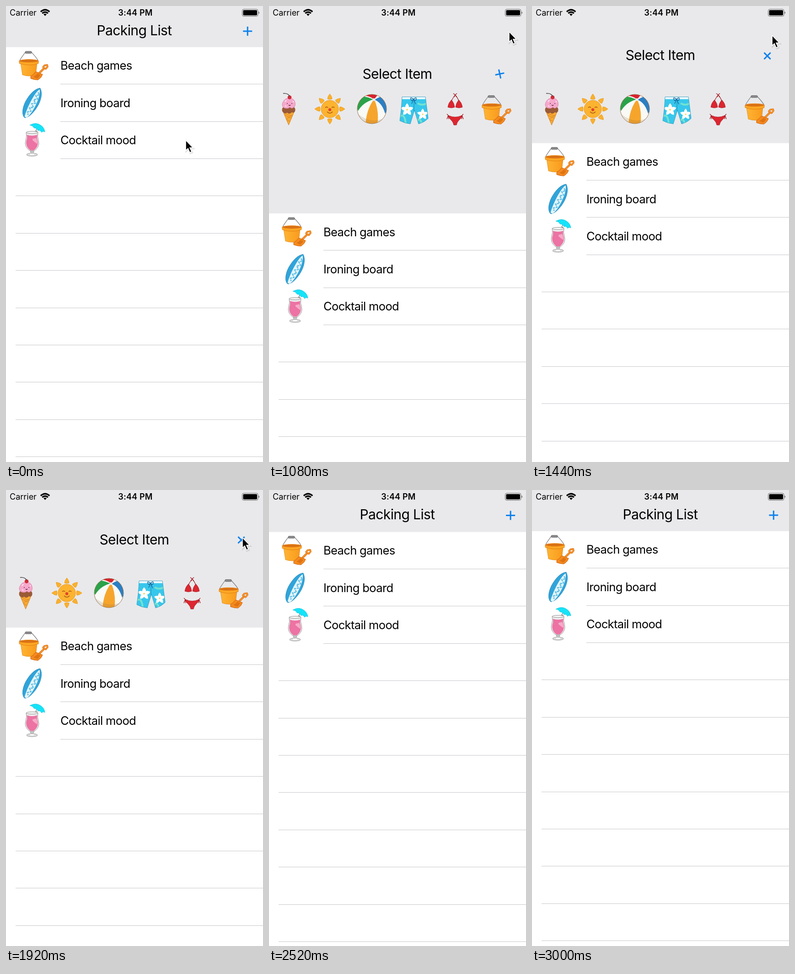
An HTML page that plays this animation: 562 px wide and 996 px high, repeating every 3.06 s.

```html
<!DOCTYPE html>
<html lang="en">
<head>
<meta charset="utf-8">
<title>Packing list</title>
<style>
  html, body { margin: 0; width: 100%; height: 100%; overflow: hidden; background: #fff; }
  svg { display: block; width: 562px; height: 996px; font-family: Inter, Roboto, sans-serif; }
  .title { font-size: 30px; letter-spacing: -.02em; text-anchor: middle; }
  .row { font-size: 25.5px; letter-spacing: -.025em; }
  .status { font-size: 18px; }
  .clock { font-weight: 600; text-anchor: middle; letter-spacing: .2px; }
</style>
</head>
<body>
<svg viewBox="0 0 562 996">
  <defs>
    <linearGradient id="orange"><stop stop-color="#ffb433"/><stop offset="1" stop-color="#f99a1c"/></linearGradient>
    <clipPath id="round"><circle r="32"/></clipPath>
    <clipPath id="legs"><path d="M-26-28H25L31 19Q22 28 10 31L1 1L-8 31Q-20 30-31 24Q-27 0-26-28Z"/></clipPath>

    <g id="bucket" stroke-linejoin="round">
      <path d="M-31-9Q-30-13-18-29H-4Q10-14 11-9" fill="none" stroke="#777" stroke-width="1.2"/>
      <rect x="-18" y="-31.5" width="14" height="4.5" rx="1.5" fill="#8a8a8d" stroke="#555" stroke-width=".7"/>
      <path d="M-28-6L-24 20Q-9 25 5 20L8-6Z" fill="url(#orange)" stroke="#e08a18" stroke-width=".8"/>
      <path d="M-31-10V-5Q-10 2 11-5V-10Z" fill="#fda724" stroke="#d9780f" stroke-width=".8"/>
      <ellipse cx="-10" cy="-10.5" rx="20.5" ry="3.2" fill="#d87216" stroke="#f28a16"/>
      <path d="M12 17L24 5" stroke="#c9620d" stroke-width="4.4"/>
      <path d="M12 17L24 5" stroke="#fb9428" stroke-width="3"/>
      <path d="M21 3L24-.5L30-1.500L31 2L27 7Z" fill="none" stroke="#c9620d" stroke-width="3.6"/>
      <path d="M21 3L24-.5L30-1.500L31 2L27 7Z" fill="none" stroke="#fb9428" stroke-width="2.400"/>
      <path d="M-6 23Q0 20 5 13L20 19Q18 26 10 31Q2 31-6 28Z" fill="#f68a1f" stroke="#c9620d"/>
      <path d="M0 24Q6 21 9 17L15 20Q12 26 8 28Z" fill="#df7413"/>
    </g>

    <g id="board" transform="rotate(27)">
      <path d="M1-37C11-30 15-14 14 1S8 33 0 36C-10 33-15 15-14 0S-9-30 1-37Z" fill="#2fa4da" stroke="#2b86b4" stroke-width=".8"/>
      <path d="M1-34C11-24 12 20 4 34H-1C-5 20-6-22 1-34Z" fill="#e4f5fb"/>
      <path d="M1-27L6-23L0-18L7-13L0-8L7-3L0 2L7 7L0 12L6 17L0 22L4 27" fill="none" stroke="#62c0e4" stroke-width="2.6" stroke-dasharray="5 1.5"/>
    </g>

    <g id="cocktail">
      <path d="M2-9L14-32" stroke="#777" stroke-width="1.3"/>
      <path d="M6-14L11-20" stroke="#555" stroke-width="2"/>
      <path d="M-5-33Q9-41 20-32Q27-27 28-18Q24-21 21-17Q18-23 13-21Q10-27 4-27Q2-32-5-33Z" fill="#16e3f8" stroke="#18b9d4" stroke-width=".7"/>
      <path d="M-13-17Q-11-8-14 0Q-18 14-5 23H5Q18 14 14 0Q11-8 13-17Z" fill="#eee" stroke="#999"/>
      <path d="M-11.500-12Q-10-5-12.500 1Q-15 13-4 22H4Q15 13 12.500 1Q10-5 11.500-12Q0-8-11.500-12Z" fill="#ec73a3"/>
      <path d="M1-3L9-5Q13 3 11 8Q7 5 1 0Z" fill="#f7abc8"/>
      <ellipse cy="-17" rx="13" ry="2.5" fill="#f5f5f5" stroke="#8f8f8f"/>
      <path d="M-4 24H4L2 31H-2Z" fill="#ccc" stroke="#999" stroke-width=".8"/>
      <ellipse cy="31.500" rx="12" ry="3.3" fill="#dcdcdc" stroke="#999"/>
      <ellipse cy="30.500" rx="5" ry="1.600" fill="#fff"/>
    </g>

    <g id="cone">
      <path d="M-13 4L0 35L13 4Z" fill="#f9a932" stroke="#c9771b" stroke-width=".8"/>
      <path d="M-9 13L6 20M-5 23L3 27M8 13L-5 22M-10 9L8 16" stroke="#d58425"/>
      <path d="M-14 5Q-17-7 0-7Q17-7 14 5Q11 10 7 7Q2 13-3 8Q-9 12-14 5Z" fill="#9a5a36"/>
      <path d="M-11-3Q-16-8-13-14Q-9-24 1-24Q12-24 14-14Q16-6 10-3Q6 0 3-4Q-3 1-11-3Z" fill="#f6a9cc" stroke="#d77ba7" stroke-width=".8"/>
      <circle cx="2" cy="-25.500" r="4.300" fill="#cf2b38"/>
      <path d="M2-28Q-1-35-12-34" fill="none" stroke="#333" stroke-width="1.400"/>
      <path d="M-3-13v2M7-13v2M0-9Q2-6 4-9" fill="none" stroke="#5c2b40" stroke-width="1.4"/>
      <path d="M-8-16l3-3M9-17l2 2M-8-7l3 1" stroke="#fff" stroke-width="1.6"/>
    </g>

    <g id="sun">
      <g id="rays" fill="#fbb02c" stroke="#e99816" stroke-width=".8"></g>
      <circle r="19" fill="#fcb32f" stroke="#ee981b"/>
      <path d="M-10-3Q-7-6-4-3M4-3Q7-6 10-3M-6 6Q0 12 6 6" fill="none" stroke="#a34a12" stroke-width="1.4"/>
      <circle cy="1.500" r="3.2" fill="#e0432b"/>
    </g>

    <g id="ball">
      <g clip-path="url(#round)">
        <circle r="32" fill="#f9f9f6"/>
        <path d="M5-21Q-4-28-14-29L-8-34L16-34Q10-28 5-21Z" fill="#d8232f"/>
        <path d="M3-21Q-20-14-30 4L-36-8L-20-28Q-8-26 3-21Z" fill="#2ba24a"/>
        <path d="M6-20Q22-14 29 10L38-6L22-27Q14-26 6-20Z" fill="#2b7fc3"/>
        <path d="M3-19Q-12 2-14 34H12Q16 4 6-19Z" fill="#f6a52c"/>
        <path d="M-31 10Q-3 34 26 20L15 36H-20Z" fill="#8b6b3f" opacity=".18"/>
      </g>
      <circle cx="4.500" cy="-20.500" r="2.8" fill="#fff" stroke="#ccc" stroke-width=".6"/>
      <circle r="32" fill="none" stroke="#9b7653"/>
    </g>

    <g id="shorts">
      <g clip-path="url(#legs)">
        <rect x="-34" y="-30" width="68" height="64" fill="#37c7ec"/>
        <path d="M-30 14Q-20 8-18 31M8-14Q18-8 28-14M8 24Q13 16 17 30" fill="none" stroke="#72e2cf" stroke-width="4"/>
        <path d="M0-20V3" stroke="#1c93bd" stroke-width="1.2"/>
        <g class="flower" transform="translate(-15 0)"></g>
        <g class="flower" transform="translate(19 10) scale(.9)"></g>
        <rect x="-30" y="-30" width="60" height="7" fill="#eefaff"/>
      </g>
      <path d="M-26-28H25L31 19Q22 28 10 31L1 1L-8 31Q-20 30-31 24Q-27 0-26-28Z" fill="none" stroke="#2795b8" stroke-width=".8"/>
      <path d="M-1-23Q-9-29-7-23T-1-23Q6-29 5-23T-1-23L-5-13M-1-23L4-12" fill="none" stroke="#18649b" stroke-width="1.3"/>
    </g>

    <g id="bikini" fill="#dc2630" stroke="#a3151d" stroke-width=".7">
      <path d="M-8-19Q-3-28 0-32Q4-28 8-19M0-32L-4-35M0-32L4-35M0-32L-2-27M0-32L3-27" fill="none" stroke-width="1.2"/>
      <path d="M-8-21Q-2-14-1-5Q-8-2-16-5Q-15-14-8-21ZM8-21Q2-14 1-5Q8-2 16-5Q15-14 8-21Z"/>
      <path d="M-15 13Q0 20 15 13Q14 19 8 24Q4 28 3 34H-3Q-4 28-8 24Q-14 19-15 13Z"/>
      <path d="M-15 13L-18 10M-15 13L-18 21M-15 13L-14 21M15 13L18 10M15 13L18 21M15 13L14 21" fill="none" stroke-width="1.3"/>
    </g>
  </defs>

  <rect id="header" width="562" fill="#e9e9eb"/>
  <g id="slider"></g>
  <text id="title" class="title" x="280.5"></text>
  <path id="plus" d="M-10 0H10M0-10V10" stroke="#0b80ee" stroke-width="3"/>

  <g id="table"><rect width="562" height="1100" fill="#fff"/></g>

  <text class="status" x="8" y="21">Carrier</text>
  <text class="status clock" x="283" y="21">3:44 PM</text>
  <g fill="none" stroke="#000" stroke-width="3.2">
    <path d="M75.800 12.500Q85.500 4 95.200 12.500M79.200 16Q85.500 10.500 91.800 16"/>
    <path d="M82 18Q85.500 15.500 89 18L85.500 21.800Z" fill="#000" stroke="none"/>
  </g>
  <rect x="516.500" y="7" width="34.500" height="15.500" rx="3.500" fill="none" stroke="#666"/>
  <rect x="518.500" y="9" width="30.500" height="11.500" rx="1.800"/>
  <path d="M552.500 12Q556 14.700 552.500 17.500Z" fill="#666"/>

  <g id="cursor">
    <path d="M1 2V24L6 19.500L10 28.500L14 27L10 18H16.500Z" fill="none" stroke="#000" stroke-width="4" opacity=".1"/>
    <path d="M0 0V22.500L5 18L9 27L13 25.300L9 16.600H16Z" stroke="#fff" stroke-width="1.600"/>
  </g>
</svg>

<script>
const $ = id => document.getElementById(id);
const place = (id, x, y) => `<use href="#${id}" x="${x}" y="${y}"/>`;
const ring = (n, d) => Array.from({ length: n },
  (_, i) => `<path d="${d}" transform="rotate(${i * 360 / n})"/>`).join('');

const LOOP = 3060, STEP = 60;
const OPEN_AT = 941, CLOSE_AT = 2026, SETTLED_AT = 2940;
const CLOSED = 89.9, TRAVEL = 209.8, ROW = 81.4;

$('rays').innerHTML = ring(8, 'M-5-22Q-5-27 0-33Q5-27 5-22Q0-20-5-22Z');
for (const flower of document.querySelectorAll('.flower'))
  flower.innerHTML = `<g fill="#fff">${ring(5, 'M0 0Q-8-6 0-14Q8-6 0 0')}</g><circle r="2" fill="#f1dc6a"/>`;

$('slider').innerHTML = [['cone', 43, 225], ['sun', 133, 225], ['ball', 225, 225],
  ['shorts', 317, 226.500], ['bikini', 407, 226], ['bucket', 497, 227]].map(a => place(...a)).join('');

const rows = [['bucket', 60, 'Beach games'], ['board', 57, 'Ironing board'], ['cocktail', 57, 'Cocktail mood']];
$('table').innerHTML += rows.map(([icon, x, label], i) =>
  place(icon, x, 40.5 + i * ROW) + `<text class="row" x="119" y="${49.5 + i * ROW}">${label}</text>`).join('');

const lines = Array.from({ length: 13 }, (_, i) => {
  const line = document.createElementNS('http://www.w3.org/2000/svg', 'rect');
  const x = i < rows.length ? 119 : 21;
  for (const [key, value] of Object.entries({ x, width: 562 - x, height: 1, fill: '#c8c8cb' }))
    line.setAttribute(key, value);
  $('table').after(line);
  return line;
});

// Remaining distance of an underdamped spring with a strong initial push
const spring = ms => {
  const s = ms / 1000;
  return Math.exp(-5 * s) * (Math.cos(14 * s) - 1.18 * Math.sin(14 * s));
};

function openness(t) {
  if (t < OPEN_AT || t >= SETTLED_AT) return 0;
  return t < CLOSE_AT ? 1 - spring(t - OPEN_AT) : spring(t - CLOSE_AT);
}

// time, x, y of the pointer tip
const path = [[0, 393, 293], [540, 514, 62], [780, 525, 50], [1080, 525, 56], [1440, 525, 64],
  [1680, 525, 66], [1920, 517, 104], [2020, 516, 110], [2280, 491, 514], [2520, 482, 1010]];

function pointer(t) {
  const i = path.findIndex(p => p[0] > t);
  if (i < 0) return [482, 1010];
  const [a, b] = [path[i - 1], path[i]];
  const u = (t - a[0]) / (b[0] - a[0]), k = u * u * (3 - 2 * u);
  return [a[1] + (b[1] - a[1]) * k, a[2] + (b[2] - a[2]) * k];
}

function draw(t) {
  const p = openness(t), top = CLOSED + TRAVEL * p;
  const isOpen = t >= OPEN_AT && t < CLOSE_AT;
  $('header').setAttribute('height', Math.max(0, top));
  $('slider').style.display = isOpen ? '' : 'none';
  $('title').textContent = isOpen ? 'Select Item' : 'Packing List';
  $('title').setAttribute('y', 63.5 + 55 * p);
  $('plus').setAttribute('transform', `translate(${528.3 - 13.7 * p} ${55 + 54 * p}) rotate(${45 * p})`);
  $('table').setAttribute('transform', `translate(0 ${top})`);
  lines.forEach((line, i) => line.setAttribute('y', Math.floor(top + ROW * (i + 1) - .7)));
  $('cursor').setAttribute('transform', `translate(${pointer(t)})`);
}

const start = performance.now();
function frame() {
  const t = (performance.now() - start) % LOOP;
  draw(Math.floor(t / STEP) * STEP);
  requestAnimationFrame(frame);
}
frame();
</script>
</body>
</html>
```
